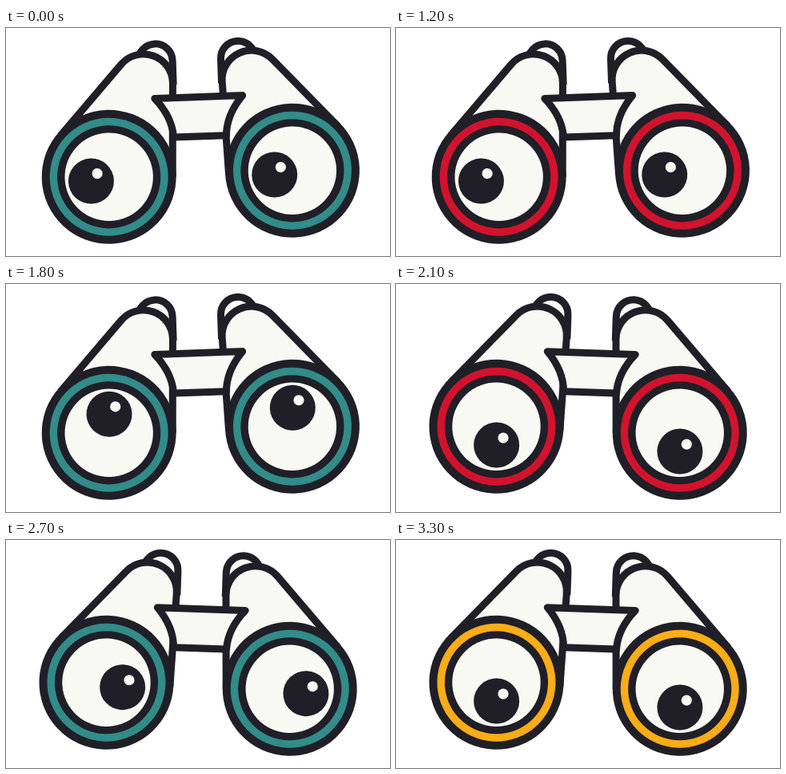
Animation of 480x286 px, one loop 3.6 s. Source, as an HTML page:

```html
<!DOCTYPE html>
<html lang="en">
<head>
<meta charset="utf-8">
<title>Binoculars</title>
<style>
  html, body { margin: 0; width: 100%; height: 100%; overflow: hidden; background: #fff; }
  svg { display: block; width: 100%; height: 100%; }
  .outlined { fill: #f8f9f3; stroke: #201f27; stroke-width: 9; stroke-linejoin: round; }
  .ink { fill: #201f27; }
  .cream { fill: #f8f9f3; }
</style>
</head>
<body>
<svg viewBox="0 0 480 286">
  <defs>
    <g id="barrel" class="outlined">
      <path d="M168.5 50V39.5a21.5 21.5 0 0 1 43 0V70"/>
      <path d="M68.1 129.2L147.1 42.4A36.6 36.6 0 0 1 210.8 68.3L206.5 185.7"/>
    </g>
    <g id="lens">
      <circle class="ink" r="84"/>
      <circle class="rim" r="74"/>
      <circle class="ink" r="64.6"/>
      <circle class="cream" r="55.2"/>
    </g>
    <g id="pupil">
      <circle class="ink" r="28.5"/>
      <circle class="cream" cx="8" cy="-9.2" r="6.6"/>
    </g>
  </defs>
  <g id="binoculars">
    <use href="#barrel"/>
    <use href="#barrel" transform="matrix(-1 0 0 1 483.4 0)"/>
    <path class="outlined" d="M187.5 86.5H297.5Q276.5 110 275.5 135.8H209.5Q208.5 110 187.5 86.5Z"/>
    <g transform="translate(127 182.8)"><use href="#lens"/><use class="gaze" href="#pupil"/></g>
    <g transform="translate(356.4 182.8)"><use href="#lens"/><use class="gaze" href="#pupil"/></g>
  </g>
</svg>
<script>
  const STEP = 300;
  const rimColors = ['#328c89', '#d2132d', '#faad17'];
  const gazes = [[-22.4, 4.5], [20.4, 5.2], [1.2, -23.5], [1, 23.2]]; // left, right, up, down
  const binoculars = document.getElementById('binoculars');
  const rim = document.querySelector('.rim');
  const pupils = document.querySelectorAll('.gaze');

  // Tilt, gaze and colour repeat every 2, 4 and 3 steps.
  function draw(time) {
    const step = Math.floor(time / STEP) % 12;
    const tilt = step % 2 ? 2 : -2;
    binoculars.setAttribute('transform', `rotate(${tilt} 242 137)`);
    rim.setAttribute('fill', rimColors[step % 3]);
    for (const pupil of pupils) pupil.setAttribute('transform', `translate(${gazes[step % 4]})`);
  }

  const start = performance.now();
  function frame() {
    draw(performance.now() - start);
    requestAnimationFrame(frame);
  }
  frame();
</script>
</body>
</html>
```
